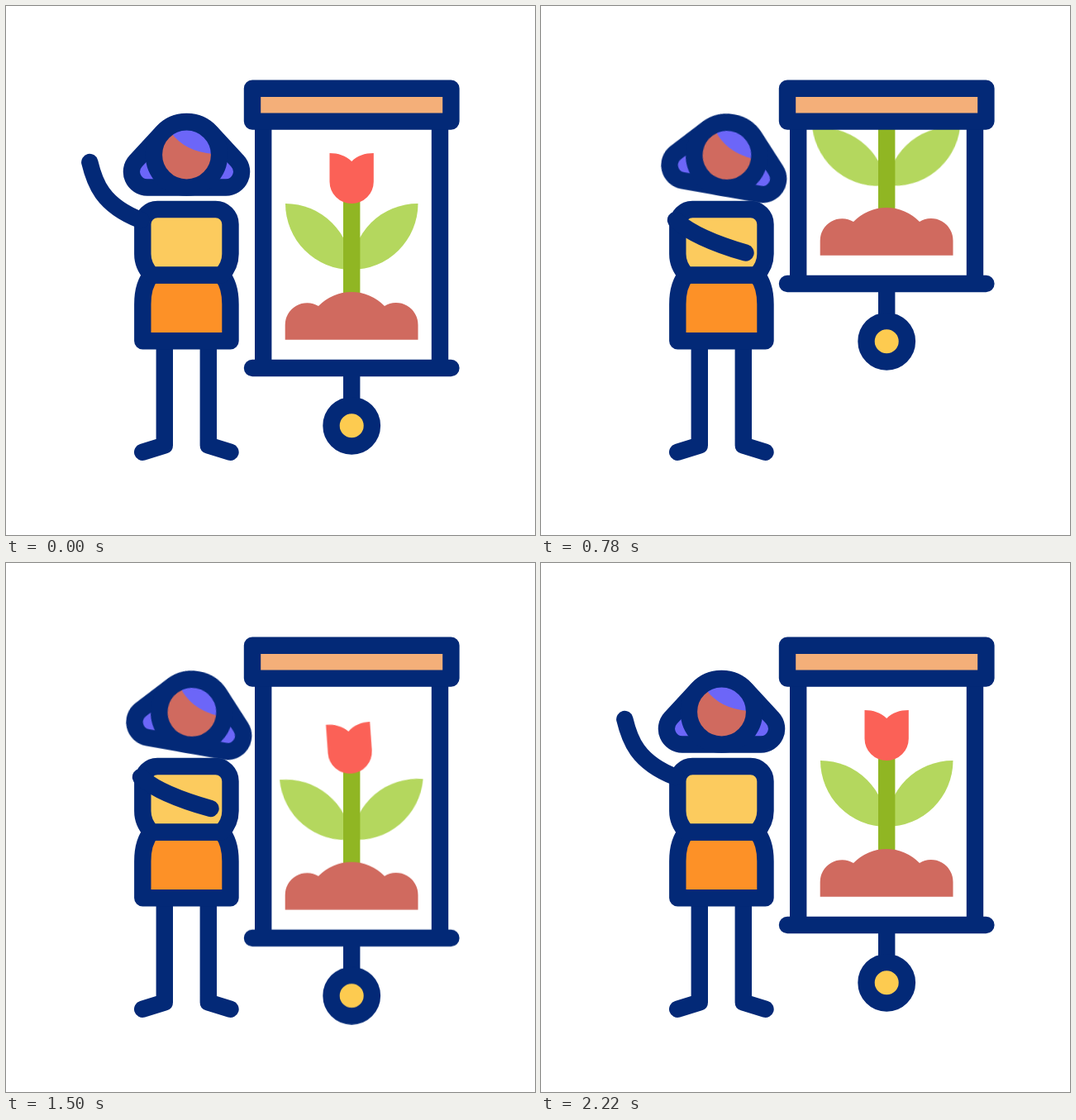
Recreate the animation shown at these times as an HTML page. Size 640 by 640 pixels, loop 2.4 s.

```html
<!DOCTYPE html>
<html lang="en">
<head>
<meta charset="utf-8">
<title>Presentation</title>
<style>
  html, body { margin: 0; width: 100%; height: 100%; overflow: hidden; background: #fff; }
  svg { display: block; width: 100%; height: 100%; }

  .line { fill: none; stroke: #032977; stroke-width: 20.4; stroke-linecap: round; stroke-linejoin: round; }
  .hair { fill: #6c66f8; }
  .skin, .soil { fill: #d06a5f; }
  .shirt { fill: #fccb5e; }
  .skirt { fill: #fd9127; }
  .case { fill: #f4af79; }
  .knob { fill: #fdcb50; }
  .leaf { fill: #b4d75e; }
  .stem { fill: #90b623; }
  .bloom { fill: #fb6157; }

  .anim {
    animation-duration: 2.4s;
    animation-timing-function: cubic-bezier(.3333, 0, .6667, 1);
    animation-iteration-count: infinite;
  }
  .head { animation-name: nod; transform-origin: 218.5px 217px; }
  .arm { animation-name: reach; }
  .roll { animation-name: roll; }
  .leaf { animation-name: droop; transform-origin: 418px 319px; }
  .left { --droop: -8deg; }
  .right { --droop: 7deg; }
  .bloom { animation-name: sway; transform-origin: 418px 242px; }

  @keyframes nod {
    0%, 8.3333%, 91.6667%, 100% { transform: rotate(0deg); }
    29.1667%, 70.8333% { transform: rotate(10deg); }
  }
  @keyframes reach {
    0%, 8.3333%, 91.6667%, 100% { d: path("M163 259C116 241 107 213 101.3 189"); }
    29.1667% { d: path("M163 259C166 261 180 280.4 247.5 301"); }
    41.6667% { d: path("M163 259C166 261 180 272 247.5 287.5"); }
    62.5% { d: path("M163 259C166 261 180 278 247.5 297"); }
    70.8333% { d: path("M163 259C166 261 180 274 247.5 290"); }
  }
  @keyframes roll {
    0%, 8.3333% { transform: translateY(0px); }
    29.1667%, 41.6667% { transform: translateY(-102px); }
    62.5% { transform: translateY(15.7px); }
    70.8333%, 100% { transform: translateY(0px); }
  }
  @keyframes droop {
    0%, 8.3333%, 50%, 91.6667%, 100% { transform: rotate(0deg); }
    29.1667%, 70.8333% { transform: rotate(var(--droop)); }
  }
  @keyframes sway {
    0%, 8.3333%, 91.6667%, 100% { transform: rotate(0deg); }
    29.1667% { transform: rotate(20deg); }
    54.1667% { transform: rotate(-15deg); }
    72.9167% { transform: rotate(11deg); }
  }
</style>
</head>
<body>
<svg viewBox="0 0 640 640">
  <defs>
    <clipPath id="below"><rect y="139" width="640" height="501"/></clipPath>
    <clipPath id="face"><circle cx="218.5" cy="180" r="32"/></clipPath>
  </defs>

  <!-- screen -->
  <g clip-path="url(#below)">
    <g class="roll anim">
      <path class="leaf left anim" d="M338 239A80 80 0 0 0 418 319A80 80 0 0 0 338 239Z"/>
      <path class="leaf right anim" d="M498.5 239A80.2 80.2 0 0 1 418 319A80.2 80.2 0 0 1 498.5 239Z"/>
      <rect class="stem" x="408" y="212" width="20.4" height="150"/>
      <path class="bloom anim" d="M391.5 178C402 178 411 181 418.2 188C425 181 434 178 444.8 178V212.5A26.6 26.6 0 0 1 391.5 212.5Z"/>
      <path class="soil" d="M337.7 403.8V386A26.6 26.6 0 0 1 378 363A55.5 55.5 0 0 1 458 363A26.6 26.6 0 0 1 498.5 386V403.8Z"/>
      <path class="line" d="M311.2 110V438M525 110V438M298 438H538.4M418.2 438V480"/>
      <circle class="line knob" style="fill:#fdcb50" cx="418.2" cy="507.8" r="24.7"/>
    </g>
  </g>
  <rect class="line" style="fill:#f4af79" x="298" y="99.8" width="240.4" height="39.8"/>

  <!-- presenter -->
  <path class="line" d="M191.8 405V531.5L165.2 539.7M244.8 405V531.5L271.5 539.7"/>
  <path class="line" style="fill:#fd9127" d="M176 325.5C169 333 165.3 346 165.3 361V405.2H271.5V361C271.5 346 267.7 333 260.8 325.5Z"/>
  <path class="line" style="fill:#fccb5e" d="M165.3 300V264A18 18 0 0 1 183.3 246H253.5A18 18 0 0 1 271.5 264V300C271.5 310 267 319 260.8 325.5H176C169.7 319 165.3 310 165.3 300Z"/>
  <g class="head anim">
    <path class="line" style="fill:#6c66f8" d="M157 187.6L189.1 152.9A40 40 0 0 1 247.9 152.9L280 187.6A19 19 0 0 1 266 219.5H171A19 19 0 0 1 157 187.6Z"/>
    <circle class="skin" cx="218.5" cy="180" r="32"/>
    <path class="hair" clip-path="url(#face)" d="M199.5 153Q217 177 252 179V140H199.5Z"/>
    <circle class="line" cx="218.5" cy="180" r="39.6"/>
  </g>
  <path class="line arm anim" d="M163 259C116 241 107 213 101.3 189"/>
</svg>
</body>
</html>
```
